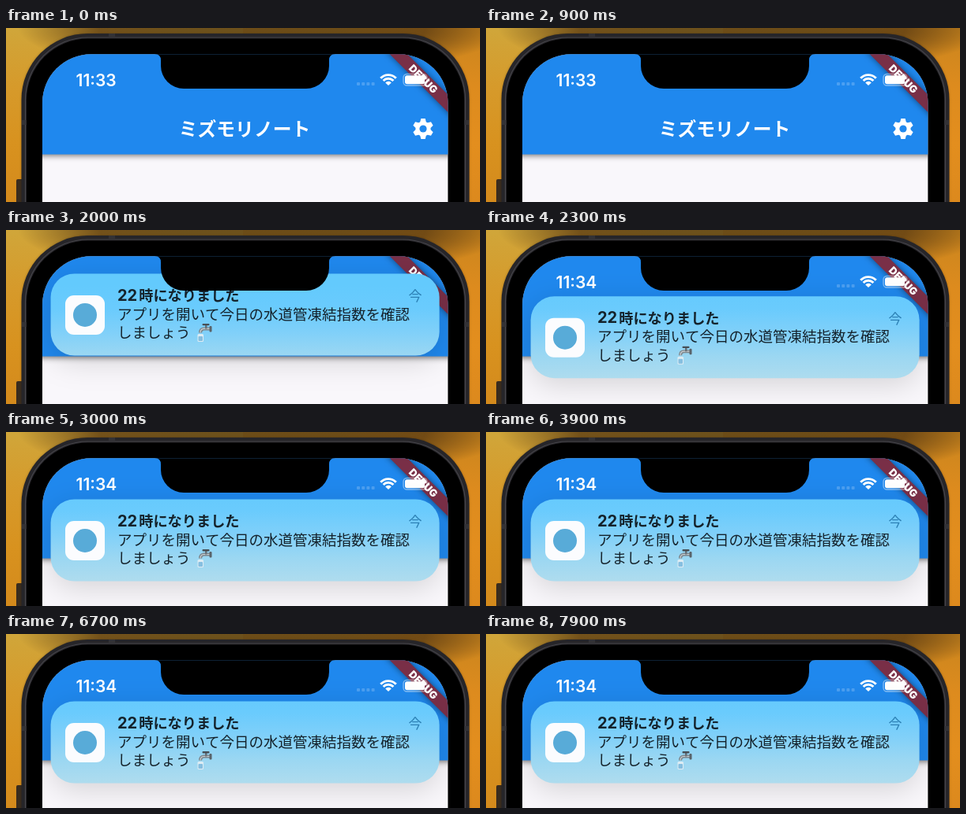
Recreate the animation shown at these times as an HTML page with a canvas. Size 600 by 221 pixels, loop 8 s.

```html
<!DOCTYPE html>
<html lang="ja">
<head>
<meta charset="utf-8">
<title>ミズモリノート</title>
<style>
html, body { margin: 0; width: 100%; height: 100%; overflow: hidden; background: #c38a20; }
canvas { display: block; width: 600px; height: 221px; }
</style>
</head>
<body>
<canvas id="stage"></canvas>
<script>
const W = 600, H = 221, LOOP = 8000, STEP = 100;
const MINUTE_AT = 1300, BANNER_AT = 1750;
const TRAVEL = 166, STIFF = 12.5;
const LATIN = 'Inter, "Liberation Sans", sans-serif';
const CJK = '"Noto Sans CJK JP", "Noto Sans CJK", sans-serif';
const BLUE = '#1f88ee';

const canvas = document.getElementById('stage');
const dpr = window.devicePixelRatio || 1;
canvas.width = W * dpr;
canvas.height = H * dpr;
const ctx = canvas.getContext('2d');

function box(x, y, w, h, r, fill) {
  ctx.beginPath();
  ctx.roundRect(x, y, w, h, r);
  if (fill) {
    ctx.fillStyle = fill;
    ctx.fill();
  }
}

function disc(x, y, r, fill) {
  ctx.beginPath();
  ctx.arc(x, y, r, 0, Math.PI * 2);
  ctx.fillStyle = fill;
  ctx.fill();
}

function label(str, x, y, font, fill, align = 'left') {
  ctx.font = font;
  ctx.fillStyle = fill;
  ctx.textAlign = align;
  ctx.fillText(str, x, y);
}

function addStops(g, colors) {
  colors.forEach((c, i) => g.addColorStop(i / (colors.length - 1), c));
  return g;
}

function ramp(x0, y0, x1, y1, colors) {
  return addStops(ctx.createLinearGradient(x0, y0, x1, y1), colors);
}

function withShadow(color, blur, dy, draw) {
  ctx.save();
  ctx.shadowColor = color;
  ctx.shadowBlur = blur * dpr;
  ctx.shadowOffsetY = dy * dpr;
  draw();
  ctx.restore();
}

function drawBackdrop() {
  ctx.fillStyle = ramp(0, 0, 0, H, ['#d0a63a', '#d69a2b', '#d8921f', '#d48a1c']);
  ctx.fillRect(0, 0, W / 2, H);
  ctx.fillStyle = ramp(0, 0, 0, H, ['#c9851e', '#dd8b1e', '#e38e1e', '#dc891d']);
  ctx.fillRect(W / 2, 0, W / 2, H);
  // soft dark patch behind the top of the phone
  ctx.save();
  ctx.translate(325, 0);
  ctx.scale(1, 0.2);
  ctx.fillStyle = addStops(ctx.createRadialGradient(0, 0, 0, 0, 0, 310),
    ['rgba(92,66,22,.85)', 'rgba(92,66,22,.85)', 'rgba(92,60,18,.8)', 'rgba(92,60,18,0)']);
  ctx.fillRect(-325, 0, W, 320);
  ctx.restore();
}

function drawBody() {
  box(13, 192, 10, 60, 2, '#3a2c1e');
  withShadow('rgba(30,15,0,.3)', 3, 0, () => box(19.5, 7, 567, 320, 84, '#262529'));
  box(24.5, 12, 557, 320, 79);
  ctx.strokeStyle = '#454449';
  ctx.lineWidth = 1.2;
  ctx.stroke();
  box(26, 13.5, 554, 320, 78, '#000');
  for (const x of [20, 580]) box(x, 117, 6, 6, 0, '#333236');
  box(130, 7, 8, 5, 0, '#333236');
}

function drawGear(x, y) {
  ctx.save();
  ctx.translate(x, y);
  ctx.fillStyle = '#fff';
  ctx.beginPath();
  ctx.arc(0, 0, 9.6, 0, Math.PI * 2);
  ctx.fill();
  for (let i = 0; i < 6; i++) {
    ctx.beginPath();
    ctx.moveTo(-4.2, -7);
    ctx.lineTo(-2.7, -13);
    ctx.lineTo(2.7, -13);
    ctx.lineTo(4.2, -7);
    ctx.fill();
    ctx.rotate(Math.PI / 3);
  }
  ctx.restore();
  disc(x, y, 4.6, BLUE);
}

function drawApp() {
  ctx.fillStyle = '#f9f7fb';
  ctx.fillRect(46, 33, 514, 188);
  withShadow('rgba(0,0,0,.5)', 7, 2.5, () => {
    ctx.fillStyle = BLUE;
    ctx.fillRect(40, 20, 526, 140.5);
  });
  label('ミズモリノート', 302, 136.5, '600 23.8px ' + CJK, '#fff', 'center');
  drawGear(528, 128);
}

function drawRibbon() {
  ctx.save();
  ctx.translate(560, 33);
  ctx.rotate(Math.PI / 4);
  withShadow('rgba(0,0,0,.5)', 8, 0, () => box(-60, 36.9, 120, 15.8, 0, '#792f47'));
  label('DEBUG', 0, 49.5, '900 13px ' + LATIN, '#fff', 'center');
  ctx.restore();
}

function drawWifi(x, y) {
  const a = Math.PI * 0.26;
  const top = -Math.PI / 2;
  ctx.strokeStyle = '#fff';
  ctx.lineWidth = 2.9;
  for (const r of [13.4, 8.7]) {
    ctx.beginPath();
    ctx.arc(x, y, r, top - a, top + a);
    ctx.stroke();
  }
  ctx.beginPath();
  ctx.moveTo(x, y);
  ctx.arc(x, y, 5.2, top - a, top + a);
  ctx.fillStyle = '#fff';
  ctx.fill();
}

function drawStatus(clock) {
  label(clock, 88.5, 73.5, '600 21px ' + LATIN, '#fff');
  for (let i = 0; i < 4; i++) box(444 + i * 6.2, 69, 4, 4, 1, 'rgba(255,255,255,.2)');
  drawWifi(484, 73);
  box(503, 58.5, 30, 14.5, 4.5);
  ctx.strokeStyle = 'rgba(255,255,255,.45)';
  ctx.lineWidth = 1.3;
  ctx.stroke();
  box(505, 60.3, 25, 11, 2.8, '#fff');
  box(534.5, 63.5, 1.8, 5, 1, 'rgba(255,255,255,.45)');
}

function drawTapEmoji(x, y) {
  ctx.save();
  ctx.translate(x, y);
  ctx.strokeStyle = '#7d868c';
  ctx.lineWidth = 4;
  ctx.beginPath();
  ctx.moveTo(19, 6.5);
  ctx.lineTo(9, 6.5);
  ctx.quadraticCurveTo(5, 7, 5, 11.5);
  ctx.stroke();
  ctx.strokeStyle = '#c9d1d5';
  ctx.lineWidth = 1.2;
  ctx.stroke();
  box(16.5, 3, 3, 7.5, 1, '#59636a');
  box(11, 1.5, 2.5, 5, 0, '#667078');
  box(7.5, 0, 9, 2.4, 1, '#464f56');
  box(1.5, 13, 7.5, 10, 1.5, '#dcecf4');
  box(2.5, 16, 5.5, 6, 1, '#86bfe0');
  ctx.restore();
}

function drawBanner(dy) {
  // the tint follows what lies behind, so it stays fixed on the screen
  const tint = ramp(0, 70, 0, 190, ['#63cafd', '#6acbfd', '#80d0f9', '#9bd7f2', '#afdcee']);
  withShadow('rgba(0,0,0,.15)', 36, 8, () => box(56.6, 85.5 + dy, 492, 104, 30, tint));
  ctx.save();
  ctx.translate(0, dy);
  box(75, 113, 50, 50, 11, '#fbfcfe');
  disc(100, 138, 15, '#58abd8');
  const ink = '#14222b';
  label('22', 141, 119.8, '700 20px ' + LATIN, ink);
  label('時になりました', 168.2, 120, '700 18.2px ' + CJK, ink);
  label('今', 509.5, 120, '500 17px ' + CJK, '#2b7fb3');
  const body = '400 18.5px ' + CJK;
  label('アプリを開いて今日の水道管凍結指数を確認', 141, 143.8, body, ink);
  label('しましょう', 141, 167.2, body, ink);
  drawTapEmoji(241, 149);
  ctx.restore();
}

function drawNotch() {
  ctx.fillStyle = '#000';
  ctx.beginPath();
  ctx.moveTo(188, 32);
  ctx.lineTo(188, 33);
  ctx.quadraticCurveTo(196, 33, 196, 41);
  ctx.lineTo(196, 48);
  ctx.arcTo(196, 77, 226, 77, 29);
  ctx.lineTo(380, 77);
  ctx.arcTo(409, 77, 409, 48, 29);
  ctx.lineTo(409, 41);
  ctx.quadraticCurveTo(409, 33, 417, 33);
  ctx.lineTo(417, 32);
  ctx.fill();
}

// critically damped spring down from above the screen
function bannerOffset(t) {
  const p = STIFF * (t - BANNER_AT) / 1000;
  return -TRAVEL * (1 + p) * Math.exp(-p);
}

function draw(t) {
  ctx.setTransform(dpr, 0, 0, dpr, 0, 0);
  drawBackdrop();
  drawBody();
  ctx.save();
  box(46, 33.2, 513.4, 260, 62);
  ctx.clip();
  drawApp();
  drawRibbon();
  drawStatus(t < MINUTE_AT ? '11:33' : '11:34');
  if (t >= BANNER_AT) drawBanner(bannerOffset(t));
  drawNotch();
  ctx.restore();
}

function tick() {
  const t = performance.now() % LOOP;
  draw(Math.floor(t / STEP) * STEP);
  requestAnimationFrame(tick);
}
tick();
</script>
</body>
</html>
```
